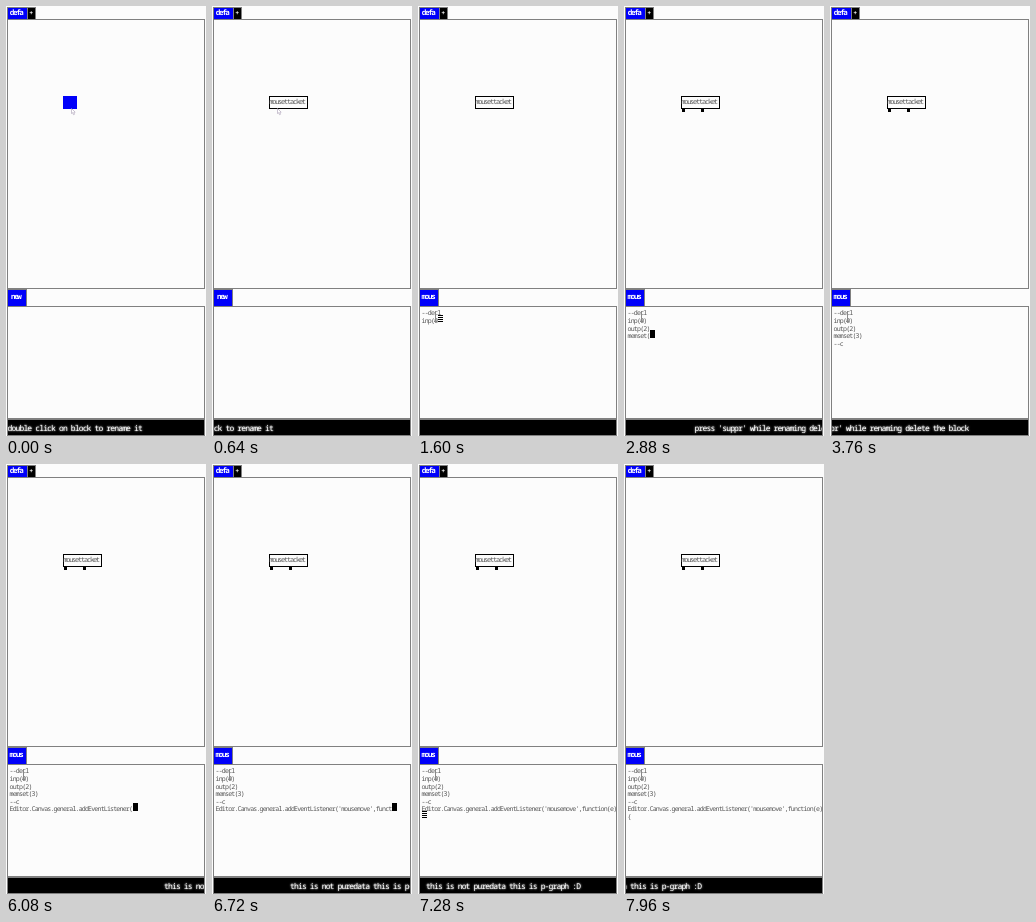
These frames come from a looping animation (200 px wide and 430 px high, 8 s). An HTML page with a canvas:

```html
<!DOCTYPE html>
<html lang="en">
<head>
<meta charset="utf-8">
<title>Patch editor</title>
<style>
html, body { margin: 0; width: 100%; height: 100%; overflow: hidden; background: #fcfcfc; }
canvas { display: block; width: 200px; height: 430px; }
</style>
</head>
<body>
<canvas id="stage" width="200" height="430"></canvas>
<script>
const ctx = document.getElementById('stage').getContext('2d');
const LOOP = 8000, STEP = 40, SPEED = 0.125;
const PAPER = '#fcfcfc', BLUE = '#0000fa', INK = '#555', EDGE = '#808080';
const MONO = '"Noto Sans Mono", "Liberation Mono", monospace';

// Keystrokes in the editor: start time, gap between keys, keys
const KEYS = [
  [840, 28, '--decl\n'],
  [1040, 40, 'inp(0'],
  [1720, 80, ')\n'],
  [1880, 80, 'outp(2)\n'],
  [2560, 50, 'memset('],
  [2960, 60, '3)\n'],
  [3130, 60, '--c'],
  [4080, 1, '\n'],
  [4200, 40, 'Editor.Canvas.general.'],
  [5200, 52, 'addEventListener('],
  [6160, 33, "'mousemove',function(e)"],
  [6900, 1, '\n'],
  [7480, 1, '{']
];

// Status hints: text and its left edge at time zero
const HINTS = [
  ['double click on block to rename it', 7],
  ["press 'suppr' while renaming delete the block", 431],
  ['this is not puredata this is p-graph :D', 918.5]
];

function rect(x, y, w, h, color) {
  ctx.fillStyle = color;
  ctx.fillRect(x, y, w, h);
}

function panel(x, y, w, h, fill, edge = EDGE) {
  rect(x, y, w, h, edge);
  rect(x + 1, y + 1, w - 2, h - 2, fill);
}

// Condensed text, each glyph centred in a fixed cell
function gridText(text, x, y, size, pitch, color, weight = 'normal') {
  ctx.font = `${weight} extra-condensed ${size}px ${MONO}`;
  ctx.textAlign = 'center';
  ctx.fillStyle = color;
  [...text].forEach((ch, i) => ctx.fillText(ch, x + (i + 0.5) * pitch, y));
}

function typed(t) {
  let text = '', last = 800;
  for (const [start, gap, keys] of KEYS) {
    if (t < start) break;
    const n = Math.min(keys.length, Math.floor((t - start) / gap) + 1);
    text += keys.slice(0, n);
    last = start + (n - 1) * gap;
  }
  return { text, age: t - last };
}

function drawTabs(t) {
  panel(1, 1, 21, 13, BLUE);
  panel(21, 1, 9, 13, '#000');
  gridText('defa', 4.4, 9, 7.5, 3.2, '#fff', 'bold');
  gridText('+', 23.6, 8.8, 6.5, 3.2, '#fff', 'bold');
  panel(1, 283, 20, 18, BLUE);
  if (t < 680) gridText('new', 5.6, 293.4, 7.5, 3.2, '#fff', 'bold');
  else gridText('mous', 4.2, 293.4, 7.5, 3.2, '#fff', 'bold');
}

function drawBlock(t) {
  if (t < 80) {
    rect(57, 90, 14, 13, BLUE);
    return;
  }
  const name = 'mousettacket'.slice(0, Math.max(0, Math.floor((t - 160) / 40)));
  const w = Math.max(14, Math.round(3.6 + name.length * 2.95));
  panel(57, 90, w, 13, PAPER, '#000');
  gridText(name, 57.8, 98.2, 7, 2.97, INK);
  if (t >= 2400) {
    rect(58, 102, 3, 4, '#000');
    rect(77, 102, 3, 4, '#000');
  }
}

function drawCaret(x, y, age) {
  const phase = age % 1000;
  if (phase >= 460 && phase < 860) return;
  if (phase < 340) rect(x, y, 5, 8, '#000');
  else for (let i = 0; i < 8; i += 2) rect(x, y + i, 5, 1, '#000');
}

function drawEditor(t) {
  const { text, age } = typed(t);
  const lines = text.split('\n');
  const baseline = i => 309.4 + i * 7.6;
  lines.forEach((line, i) => gridText(line, 4, baseline(i), 6.6, 3.14, INK));
  if (t >= 800) {
    const row = lines.length - 1;
    const x = Math.round(4.3 + lines[row].length * 3.14);
    drawCaret(x, Math.round(baseline(row) - 8), age);
  }
}

function drawPointer(t) {
  const k = Math.min(1, Math.max(0, (t - 640) / 160));
  const e = k * k * (3 - 2 * k);
  const x = 65.5 + (16 - 65.5) * e, y = 102.5 + (305 - 102.5) * e;
  if (y > 300) {
    rect(x + 1, y, 1, 10, '#888');
    rect(x, y + 10, 3, 1, '#888');
    return;
  }
  ctx.beginPath();
  [[0, 0], [0, 5], [1.2, 4.2], [2, 6.2], [3, 5.8], [2.3, 3.9], [3.7, 3.7]]
    .forEach(([dx, dy]) => ctx.lineTo(x + dx, y + dy));
  ctx.closePath();
  ctx.fillStyle = '#fff';
  ctx.fill();
  ctx.strokeStyle = '#a89cb4';
  ctx.lineWidth = 0.6;
  ctx.stroke();
}

function drawStatus(t) {
  panel(1, 413, 198, 17, '#000');
  ctx.save();
  ctx.beginPath();
  ctx.rect(2, 414, 196, 15);
  ctx.clip();
  ctx.shadowColor = '#fff';
  ctx.shadowBlur = 2;
  for (const [text, x0] of HINTS) {
    const x = x0 - Math.max(t, STEP) * SPEED;
    if (x < 200 && x + text.length * 3.95 > 0) gridText(text, x, 425, 8, 3.95, '#fff');
  }
  ctx.restore();
}

function draw(now) {
  const t = Math.floor((now % LOOP) / STEP) * STEP;
  rect(0, 0, 200, 430, PAPER);
  panel(1, 13, 198, 270, PAPER);
  panel(1, 300, 198, 113, PAPER);
  drawTabs(t);
  drawBlock(t);
  drawEditor(t);
  drawPointer(t);
  drawStatus(t);
}

ctx.textRendering = 'geometricPrecision';
const began = performance.now();
function tick() {
  draw(performance.now() - began);
  requestAnimationFrame(tick);
}
tick();
</script>
</body>
</html>
```
